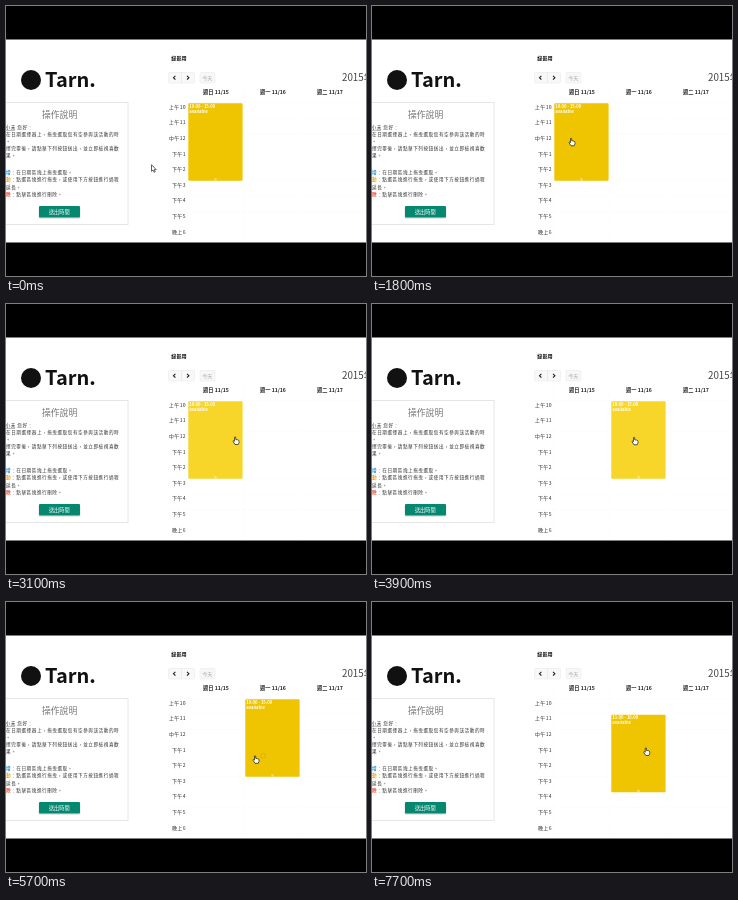
An HTML page for the animation above (7800 ms loop, 360x270 px).

```html
<!DOCTYPE html>
<html lang="zh-Hant">
<head>
<meta charset="utf-8">
<title>Calendar drag</title>
<style>
  html, body { margin: 0; width: 100%; height: 100%; overflow: hidden; background: #fff; }
  svg { display: block; width: 100vw; height: 100vh; }
  text { font-family: "Noto Sans CJK TC", "Noto Sans CJK", "Noto Sans", sans-serif; white-space: pre; }
</style>
</head>
<body>
<svg id="stage" viewBox="0 0 360 270"></svg>
<script>
const stage = document.getElementById('stage');

function add(tag, attrs, parent = stage) {
  const el = document.createElementNS('http://www.w3.org/2000/svg', tag);
  for (const key in attrs) el.setAttribute(key, attrs[key]);
  parent.appendChild(el);
  return el;
}
const rect = (x, y, width, height, fill, more = {}, parent) =>
  add('rect', { x, y, width, height, fill, ...more }, parent);
const line = (d, stroke, width = 1, parent) =>
  add('path', { d, stroke, 'stroke-width': width, fill: 'none' }, parent);
// y is the middle of the glyphs
function label(str, x, y, size, fill = '#222', more = {}, parent) {
  const el = add('text', { x, y: y + size * 0.37, 'font-size': size, fill, ...more }, parent);
  el.textContent = str;
  return el;
}
const middle = { 'text-anchor': 'middle' };
const bold = { 'font-weight': 700 };

rect(0, 0, 360, 270, '#fff');

// Brand
add('circle', { cx: 25, cy: 74, r: 10, fill: '#111' });
label('Tarn.', 39, 74, 20, '#111', bold);

// Instructions card
const loose = { 'letter-spacing': 0.55 };
rect(-10, 96.5, 132, 122, '#fff', { stroke: '#e6e6e6' });
label('操作說明', 36, 109, 8.8, '#777');
label('小禾 您好：', -0.5, 121, 4.6, '#333', loose);
line('M0 124.3H9', '#777', 0.6);
[
  ['在日期選擇器上，拖曳選取您有空參與該活動的時', 128.3],
  ['。', 135.3],
  ['擇完畢後，請點擊下列按鈕送出，並立即檢視喜歡', 142.4],
  ['果。', 149.7],
  ['增：在日期區塊上拖曳選取。', 166, '#2a8fd0'],
  ['動：點選區塊進行拖曳，或使用下方按鈕進行過程', 173.4, '#f0a000'],
  ['延長。', 181],
  ['除：點擊區塊進行刪除。', 188.2, '#e2402a']
].forEach(([str, y, tint]) => {
  const row = label('', 0, y, 4.6, '#333', loose);
  const head = add('tspan', tint ? { fill: tint, ...bold } : {}, row);
  head.textContent = str[0];
  row.append(str.slice(1));
});
rect(32.5, 201, 42, 11.8, '#000', { rx: 1, opacity: 0.12 });
rect(33, 200, 41, 11.6, '#058770', { rx: 1 });
label('送出時間', 53.3, 205.8, 5.2, '#fff', { ...middle, 'font-weight': 500 });

// Calendar
const DAY = 57, HOUR = 15.6;
label('錄影用', 165.3, 52, 5.1, '#111', bold);
rect(162.5, 66.5, 26, 10.5, '#f8f8f8', { rx: 1, stroke: '#ececec', 'stroke-width': 0.7 });
line('M175.5 66.5V77', '#e6e6e6', 0.7);
line('M169.4 69.8L167.5 71.7L169.4 73.6M181 69.8L182.9 71.7L181 73.6', '#222', 1.1);
rect(194, 66.5, 15, 10.5, '#f7f7f7', { rx: 1, stroke: '#eee', 'stroke-width': 0.7 });
label('今天', 201.3, 71.8, 5.1, '#aaa', middle);
label('2015年', 336, 71, 9.8, '#444');
['週日 11/15', '週一 11/16', '週二 11/17'].forEach((str, i) => {
  label(str, 210 + DAY * i, 86.5, 5.2, '#222', { ...middle, ...bold });
  line(`M${181 + DAY * i} 81V236`, '#fbfbfb', 0.6);
});
['上午10', '上午11', '中午12', '下午1', '下午2', '下午3', '下午4', '下午5', '晚上6'].forEach((str, i) => {
  label(str, 180, 101 + HOUR * i, 5.1, '#333', { 'text-anchor': 'end', 'letter-spacing': 0.35 });
  line(`M163 ${96.5 + HOUR * i}H360`, '#fcfcfc', 0.6);
});

// Event block
const block = add('g', {});
const face = rect(182.3, 97.2, 54.3, 77.5, '#efc400', { rx: 1 }, block);
const hours = label('', 183.2, 100, 4.2, '#fff', bold, block);
label('available', 183.2, 105.2, 4.2, '#fff', bold, block);
line('M208.4 172.8H210.6M208.4 174H210.6', '#fff', 0.5, block);

// Letterbox
rect(0, 0, 360, 33.5, '#000');
rect(0, 236.5, 360, 33.5, '#000');

// Pointers, with their centre at 0,0
const ring = add('circle', { r: 2.4, fill: 'none', stroke: '#c79f1c', 'stroke-width': 0.7, opacity: 0.7 });
const arrow = add('path', {
  d: 'M-2 -3.8V2.8L-.5 1.5L.6 3.8L1.7 3.3L.7 1.1H2.7Z',
  fill: '#fff', stroke: '#222', 'stroke-width': 0.7
});
const hand = add('path', {
  d: 'M-1.5 -3.6Q-.8 -4.2 -.3 -3.5V-1.2L1.7 -.9Q3 -.6 3 .5V1.8L2.2 3.8H-1L-2.9 .9Q-3.1 -.2 -2.1 0L-1.5 .6Z',
  fill: '#fff', stroke: '#222', 'stroke-width': 0.75
});

const LOOP = 7800, STEP = 100;
// time, x, y
const path = [
  [0, 147.5, 162.5], [300, 148, 162], [1300, 199, 137], [1800, 200, 136],
  [2600, 205, 136.5], [3700, 263, 137], [4300, 263, 137], [5200, 251, 157],
  [5700, 250, 157.5], [5900, 256, 150], [6500, 264, 164.5], [6900, 264, 164.5],
  [7500, 274, 150], [7800, 275, 149.5]
];

function pointAt(t) {
  const i = path.findIndex((p, n) => n && t <= p[0]);
  const [t0, x0, y0] = path[i - 1], [t1, x1, y1] = path[i];
  const u = (t - t0) / (t1 - t0), e = u * u * (3 - 2 * u);
  return [x0 + (x1 - x0) * e, y0 + (y1 - y0) * e];
}

const between = (t, from, to) => t >= from && t < to;
const show = (el, on) => el.setAttribute('visibility', on ? 'visible' : 'hidden');

function draw(t) {
  const [x, y] = pointAt(t);
  const day = t >= 2600 && (t > 4000 || x > 238) ? 1 : 0;
  const half = t >= 6400 ? 2 : t >= 6200 ? 1 : 0;
  const held = between(t, 2500, 4300) || between(t, 5900, 6600);
  const minutes = half === 1 ? '30' : '00';
  const start = 10 + (half >> 1);

  block.setAttribute('transform', `translate(${day * DAY} ${half * HOUR / 2})`);
  face.setAttribute('fill', held ? '#f7d629' : '#efc400');
  hours.textContent = `${start}:${minutes} - ${start + 5}:${minutes}`;

  const over = x > 182;
  show(arrow, !over);
  show(hand, over);
  show(ring, between(t, 5600, 5800));
  for (const el of [arrow, hand]) el.setAttribute('transform', `translate(${x} ${y})`);
  ring.setAttribute('transform', `translate(${x + 7.2} ${y - 3.7})`);
}

const begin = performance.now();
function tick() {
  const t = (performance.now() - begin) % LOOP;
  draw(Math.floor(t / STEP) * STEP);
  requestAnimationFrame(tick);
}
tick();
</script>
</body>
</html>
```
